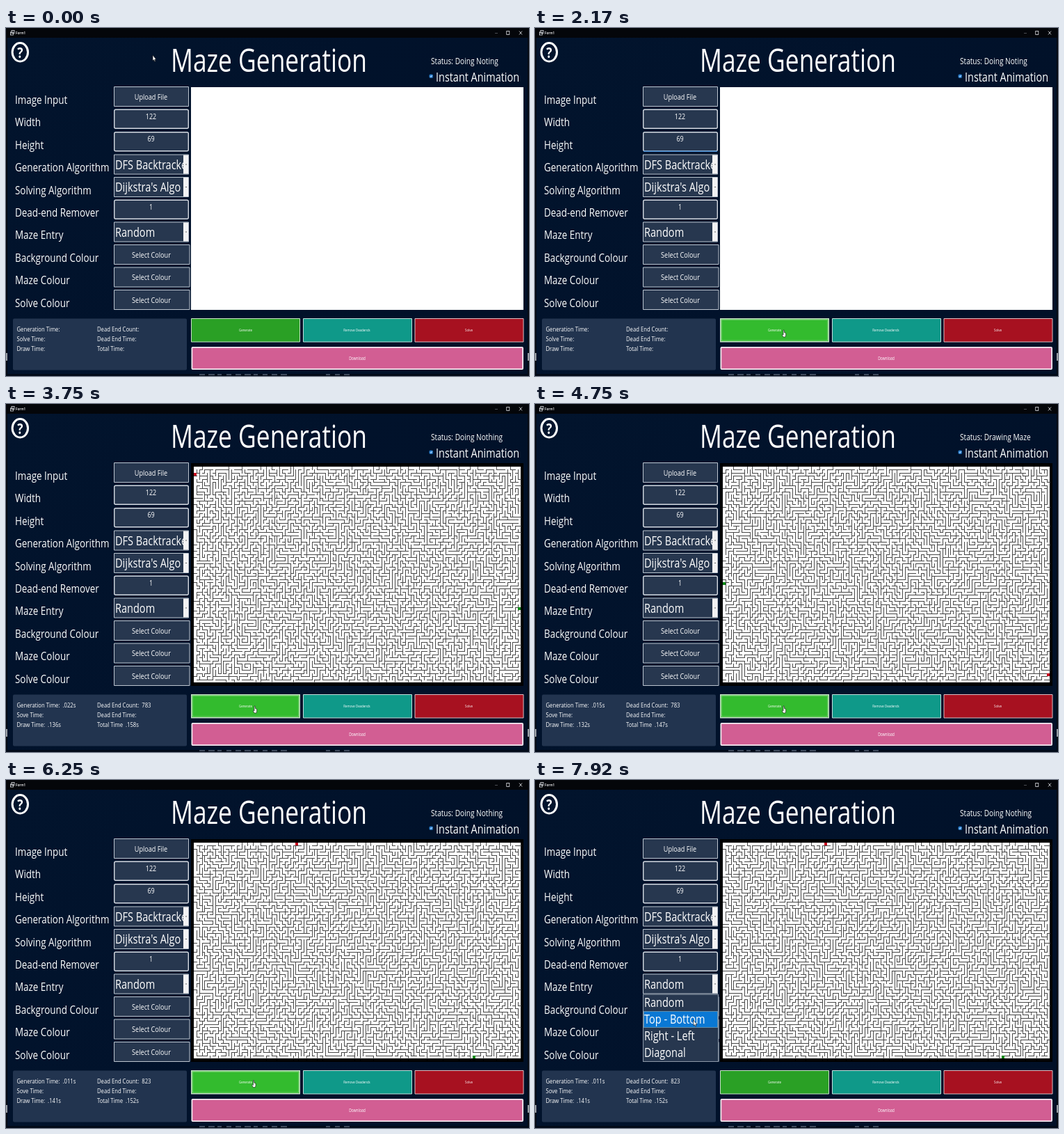
An HTML page with a canvas that plays this animation: 752 by 500 pixels, repeating every 8 s.

```html
<!DOCTYPE html>
<html lang="en">
<head>
<meta charset="utf-8">
<title>Maze Generation</title>
<style>
  html, body { margin: 0; width: 100%; height: 100%; overflow: hidden; background: #01122b; }
  canvas { display: block; width: 752px; height: 500px; }
</style>
</head>
<body>
<canvas id="stage" width="752" height="500"></canvas>
<script>
const LOOP = 8000;
const ASPECT = 0.785; // the whole window is shown with narrow pixels
const FONT = '"Open Sans", "Noto Sans", sans-serif';
const COLS = 122, ROWS = 69;
const FIELD = '#27374f', LINE = '#bcc4cf', WALL = '#484848';
const ctx = document.getElementById('stage').getContext('2d');

function rect(x, y, w, h, fill, c = ctx) {
  c.fillStyle = fill;
  c.fillRect(x, y, w, h);
}

function box(x, y, w, h, fill, border = LINE, line = 1, radius = 0) {
  ctx.beginPath();
  ctx.roundRect(x + line / 2, y + line / 2, w - line, h - line, radius);
  ctx.fillStyle = fill;
  ctx.fill();
  ctx.strokeStyle = border;
  ctx.lineWidth = line;
  ctx.stroke();
}

function dotted(x, y, w, h, color) {
  ctx.setLineDash([1, 1]);
  ctx.strokeStyle = color;
  ctx.lineWidth = 0.8;
  ctx.strokeRect(x, y, w, h);
  ctx.setLineDash([]);
}

// y is the middle of the capital letters
function text(str, x, y, size, align = 'left', weight = 400) {
  ctx.save();
  ctx.translate(x, y + size * 0.357 - 0.5);
  ctx.scale(ASPECT, 1);
  ctx.font = `${weight} ${size}px ${FONT}`;
  ctx.textAlign = align;
  ctx.fillStyle = '#fff';
  ctx.fillText(str, 0, 0);
  ctx.restore();
}

function seeded(seed) {
  return () => {
    seed = (seed + 0x6d2b79f5) | 0;
    let n = Math.imul(seed ^ (seed >>> 15), seed | 1);
    n ^= n + Math.imul(n ^ (n >>> 7), n | 61);
    return ((n ^ (n >>> 14)) >>> 0) / 4294967296;
  };
}

// Depth-first backtracker; right[] and down[] mark opened walls
function carve(seed) {
  const random = seeded(seed), size = COLS * ROWS;
  const seen = new Uint8Array(size), right = new Uint8Array(size), down = new Uint8Array(size);
  const stack = [Math.floor(random() * size)];
  seen[stack[0]] = 1;
  while (stack.length) {
    const cell = stack[stack.length - 1], col = cell % COLS;
    const next = [];
    if (col > 0) next.push(cell - 1);
    if (col < COLS - 1) next.push(cell + 1);
    if (cell >= COLS) next.push(cell - COLS);
    if (cell < size - COLS) next.push(cell + COLS);
    const open = next.filter(n => !seen[n]);
    if (!open.length) { stack.pop(); continue; }
    const to = open[Math.floor(random() * open.length)];
    const first = Math.min(cell, to);
    (Math.abs(to - cell) === 1 ? right : down)[first] = 1;
    seen[to] = 1;
    stack.push(to);
  }
  return { right, down };
}

function paintMaze(seed, red, green) {
  const canvas = document.createElement('canvas');
  canvas.width = 478;
  canvas.height = 320;
  const c = canvas.getContext('2d');
  const px = col => Math.round(4 + col * 470 / COLS);
  const py = row => Math.round(5 + row * 310 / ROWS);
  const { right, down } = carve(seed);
  rect(0, 0, 478, 320, '#000', c);
  rect(4, 5, 470, 310, '#fff', c);
  for (let row = 0; row < ROWS; row++) {
    for (let col = 0; col < COLS; col++) {
      const i = row * COLS + col;
      const x = px(col), y = py(row), x2 = px(col + 1), y2 = py(row + 1);
      if (!right[i] && col < COLS - 1) rect(x2, y, 1, y2 - y + 1, WALL, c);
      if (!down[i] && row < ROWS - 1) rect(x, y2, x2 - x + 1, 1, WALL, c);
    }
  }
  for (const [[col, row], color] of [[red, '#c80a1e'], [green, '#0a8a14']])
    rect(px(col), py(row), 4, 4, color, c);
  return canvas;
}

const mazes = [
  paintMaze(11, [0, 2], [121, 45]),
  paintMaze(27, [121, 66], [0, 37]),
  paintMaze(43, [106, 0], [85, 68]),
  paintMaze(68, [38, 0], [104, 68])
];

const DRAWING = 'Drawing Maze', IDLE = 'Doing Nothing';
const states = [
  { at: 0, status: 'Doing Noting' },
  { at: 2420, maze: 0, status: DRAWING, times: ['.022s', '.136s', '.158s'], dead: 783 },
  { at: 2750, maze: 0, status: IDLE, times: ['.022s', '.136s', '.158s'], dead: 783 },
  { at: 4500, maze: 1, status: DRAWING, times: ['.015s', '.132s', '.147s'], dead: 783 },
  { at: 4920, maze: 1, status: IDLE, times: ['.015s', '.132s', '.147s'], dead: 825 },
  { at: 5420, maze: 2, status: DRAWING, times: ['.008s', '.131s', '.139s'], dead: 825 },
  { at: 5920, maze: 3, status: DRAWING, times: ['.011s', '.141s', '.152s'], dead: 823 },
  { at: 6060, maze: 3, status: IDLE, times: ['.011s', '.141s', '.152s'], dead: 823 }
];

// time, x, y of the pointer tip
const path = [
  [0, 211, 39], [250, 211, 39], [900, 216, 158], [1700, 218, 160], [1830, 357, 434],
  [6200, 357, 434], [6900, 252, 276], [7080, 250, 277], [7250, 258, 291],
  [7400, 257, 292], [7830, 230, 342], [7920, 228, 345], [LOOP, 228, 345]
];

function pointerAt(t) {
  const i = path.findIndex(p => p[0] > t);
  const [t0, x0, y0] = path[i - 1], [t1, x1, y1] = path[i];
  const k = (t - t0) / (t1 - t0), e = k * k * (3 - 2 * k);
  return [x0 + (x1 - x0) * e, y0 + (y1 - y0) * e];
}

function polygon(x, y, points) {
  ctx.beginPath();
  for (const [dx, dy] of points) ctx.lineTo(x + dx, y + dy);
  ctx.closePath();
  ctx.fillStyle = '#fff';
  ctx.fill();
  ctx.strokeStyle = '#111';
  ctx.lineWidth = 0.6;
  ctx.stroke();
}

const ARROW = [[0, 0], [0, 8], [1.6, 6.6], [2.8, 9.3], [3.9, 8.8], [2.8, 6.2], [4.8, 6]];
const HAND = [[0, 0], [1.2, 0], [1.5, 3.6], [3.6, 4.2], [3.6, 8], [2.8, 10],
  [0, 10], [-1.8, 6.8], [-1.2, 6], [0, 7]];

function drawWindow() {
  const bg = ctx.createLinearGradient(0, 0, 752, 500);
  bg.addColorStop(0, '#02142d');
  bg.addColorStop(0.5, '#01122b');
  bg.addColorStop(1, '#011027');
  rect(0, 0, 752, 500, bg);
  rect(0, 0, 752, 14, '#04060a');
  rect(0, 14, 2, 486, '#060a12');
  rect(750, 14, 2, 486, '#060a12');
  rect(0, 467, 2, 11, '#9a9da3');
  rect(750, 467, 2, 11, '#9a9da3');
  rect(0, 497, 752, 3, '#020a18');
  for (let x = 278; x < 490; x += 13)
    if (x < 400 || x > 448) rect(x, 497, 6 + x % 4, 2, '#3f4a5c');

  ctx.strokeStyle = '#e4e6ea';
  ctx.lineWidth = 0.8;
  ctx.strokeRect(8, 3.5, 4, 4);
  ctx.strokeRect(6.5, 6, 4, 4);
  ctx.strokeRect(719.8, 4.5, 4, 5);
  rect(703, 7, 4, 1, '#4a4d53');
  ctx.beginPath();
  ctx.moveTo(738, 4.5); ctx.lineTo(742, 9.5);
  ctx.moveTo(742, 4.5); ctx.lineTo(738, 9.5);
  ctx.stroke();
  text('Form1', 14, 7.5, 5.8, 'left', 600);

  ctx.beginPath();
  ctx.ellipse(20.3, 34.8, 11.2, 13.2, 0, 0, Math.PI * 2);
  ctx.strokeStyle = '#fff';
  ctx.lineWidth = 3;
  ctx.stroke();
  text('?', 20.3, 35.5, 22, 'center', 700);
  text('Maze Generation', 378, 47, 45, 'center');
}

function combo(y, value) {
  box(155, y, 108, 29, FIELD);
  text(value, 157, y + 15, 18.5);
  rect(255, y + 1, 7, 27, '#f2f2f4');
  rect(258, y + 14, 2, 1, '#666');
}

function drawForm(t) {
  ['Image Input', 'Width', 'Height', 'Generation Algorithm', 'Solving Algorithm',
    'Dead-end Remover', 'Maze Entry', 'Background Colour', 'Maze Colour', 'Solve Colour'
  ].forEach((label, i) => text(label, 13, 103.3 + i * 32.4, 17.1));

  box(155, 84, 108, 29, FIELD);
  text('Upload File', 208.5, 99.5, 11.6, 'center');
  for (const [y, value] of [[116.5, '122'], [149, '69'], [246.5, '1']]) {
    box(155, y, 108, 28.5, FIELD, '#d5dae2', 1.4, 2);
    text(value, 208.5, y + 10.5, 11.4, 'center');
  }
  if (t > 1500 && t < 2250) rect(156, 176.5, 106, 1.3, '#2d7fd0');
  ctx.save();
  ctx.beginPath();
  ctx.rect(155, 180, 108, 130);
  ctx.clip();
  combo(181.5, 'DFS Backtracke');
  combo(214, "Dijkstra's Algo");
  combo(278.5, 'Random');
  ctx.restore();
  for (const y of [311, 343.5, 376]) {
    box(155, y, 109.5, 29, FIELD);
    text('Select Colour', 209, y + 15, 11.6, 'center');
  }
}

function drawStatus({ status, maze, times = ['', '', ''], dead = '' }) {
  text('Status: ' + status, 611, 48, 12.9);
  box(608.5, 66.5, 5.5, 5.5, '#3a8fe0', '#1b62a8', 0.8, 1);
  ctx.strokeStyle = '#dfefff';
  ctx.lineWidth = 0.8;
  ctx.beginPath();
  ctx.moveTo(610, 69.3); ctx.lineTo(611, 70.5); ctx.lineTo(612.7, 68);
  ctx.stroke();
  text('Instant Animation', 618, 70.8, 18.4);

  rect(266, 85, 478, 320, '#fff');
  if (maze !== undefined) ctx.drawImage(mazes[maze], 266, 85);

  ctx.beginPath();
  ctx.roundRect(10, 417.5, 250, 74, 2);
  ctx.fillStyle = '#22344f';
  ctx.fill();
  const [gen, draw, total] = times, ran = dead !== '';
  const line = (str, x, row) => text(str, x, 433.3 + row * 14, 9.8);
  line('Generation Time:  ' + gen, 15.5, 0);
  line(ran ? 'Sove Time:' : 'Solve Time:', 15.5, 1);
  line('Draw Time:  ' + draw, 15.5, 2);
  line('Dead End Count:  ' + dead, 131, 0);
  line('Dead End Time:', 131, 1);
  line(ran ? 'Total Time  ' + total : 'Total Time:', 131, 2);
}

function drawButtons(hover, focused) {
  box(266, 417, 157, 34.5, hover ? '#33bb2e' : '#2aa025', '#c9e2c8', focused ? 1.5 : 1);
  if (focused) dotted(268.5, 419.5, 152, 29.5, '#b5e6b0');
  box(427, 417, 157, 34.5, '#0f9989', '#c2dedb');
  box(587.5, 417, 157, 34.5, '#a71120', '#dcbcc1');
  box(266.5, 458, 477.5, 33, '#d25e93', '#f7eaf1', 1.8, 1);
  text('Generate', 344.5, 435, 5.6, 'center');
  text('Remove Deadends', 504.5, 435, 5.6, 'center');
  text('Solve', 665.5, 435, 5.6, 'center');
  text('Download', 505, 475.3, 6.4, 'center');
}

function drawMenu(selected) {
  box(155, 307.5, 109, 97.5, FIELD, '#8d98a8');
  ['Random', 'Top - Bottom', 'Right - Left', 'Diagonal'].forEach((item, i) => {
    const y = 308 + i * 24;
    if (i === selected) {
      rect(156, y, 107, 24, '#0a78d4');
      dotted(156.5, y + 0.5, 106, 23, '#e8b070');
    }
    text(item, 157, y + 12.3, 18.5);
  });
}

function render(t) {
  const state = states.filter(s => s.at <= t).pop();
  const [x, y] = pointerAt(t);
  const hover = x > 266 && x < 423 && y > 418 && y < 451;
  const menu = t >= 7320;
  drawWindow();
  drawForm(t);
  drawStatus(state);
  drawButtons(hover, t >= 1830 && !menu);
  if (menu) drawMenu(y > 333 ? 1 : 0);
  polygon(x, y, hover ? HAND : ARROW);
}

const start = performance.now();
function tick() {
  render((performance.now() - start) % LOOP);
  requestAnimationFrame(tick);
}
tick();
</script>
</body>
</html>
```
